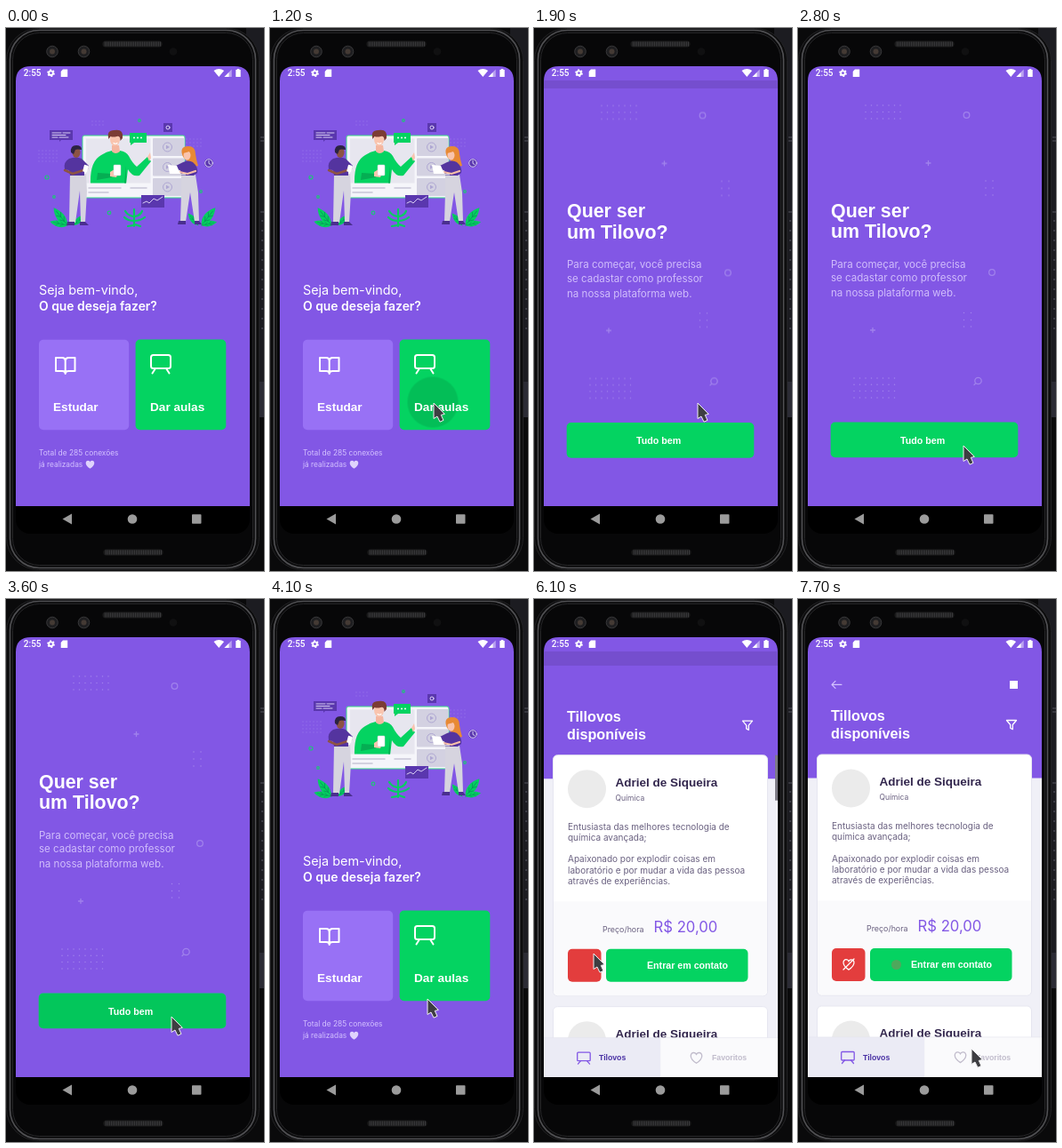
An HTML page for the animation above (8000 ms loop, 290 px wide and 611 px high).

```html
<!DOCTYPE html>
<html lang="pt-BR">
<head>
<meta charset="utf-8">
<title>App de aulas</title>
<style>
html, body { margin: 0; width: 100%; height: 100%; overflow: hidden; background: #0a0a0b; }
svg { display: block; position: absolute; left: 0; top: 0; }
.view, .page, .reveal { position: absolute; left: 0; top: 0; width: 263px; height: 479px; overflow: hidden; }
.view { left: 11px; top: 59px; background: #8257e5; }

.p { font-family: Inter, sans-serif; }
.a { font-family: "Liberation Sans", Arial, sans-serif; font-weight: 700; }
.line { fill: none; stroke-linecap: round; stroke-linejoin: round; }
.dots { fill: none; stroke-linecap: round; stroke-width: 1.5; }

/* All motion shares one 8 s clock; 1.25% = 100 ms */
.home, .reveal, .page, .dim, .tap, .late, .pattern, .bar, .cursor {
  animation: 8s cubic-bezier(.20833, .82, .25, 1) infinite;
}
.reveal { --y: 479px; }
.reveal > .page { --y: -459.4px; }
.teach, .teach > .page { animation-name: teach; }
.study, .study > .page { animation-name: study; }
.home { animation-name: home; }
.dim { animation-name: dim; }
.pattern { animation-name: pattern; }
.late { animation-name: late; }
.bar { animation-name: bar; animation-timing-function: linear; }
.cursor { animation-name: cursor; animation-timing-function: linear; }
.tap { animation-name: tap; animation-timing-function: linear; transform-box: fill-box; transform-origin: center; }
.t1 { animation-delay: -6800ms; }
.t2 { animation-delay: -4600ms; }
.t3 { animation-delay: -3200ms; }

@keyframes teach {
  0%, 20.26% { transform: translateY(var(--y)); }
  25.58%, 45.63% { transform: translateY(0); }
  50.94%, 100% { transform: translateY(var(--y)); }
}
@keyframes study {
  0%, 76.24% { transform: translateY(var(--y)); }
  76.25% { transform: translateY(calc(var(--y) * .034)); }
  77.5%, 100% { transform: translateY(0); }
}
@keyframes home {
  0%, 20.26% { transform: translateY(0); }
  25.58%, 45.63% { transform: translateY(-9.58px); }
  50.94%, 76.24% { transform: translateY(0); }
  76.25%, 100% { transform: translateY(-9.58px); }
}
@keyframes dim {
  0%, 20.26% { opacity: 0; }
  20.9%, 46.6% { opacity: .1; }
  50.94%, 76.24% { opacity: 0; }
  76.25%, 100% { opacity: .1; }
}
@keyframes tap {
  0% { opacity: .1; transform: scale(.3); }
  1.25% { opacity: .1; transform: scale(.75); }
  2.5% { opacity: .06; transform: scale(1); }
  3.75%, 100% { opacity: 0; transform: scale(1); }
}
@keyframes pattern { 0%, 22.49% { opacity: 0; } 22.5%, 100% { opacity: 1; } }
@keyframes late { 0%, 79.99% { opacity: 0; } 80%, 100% { opacity: 1; } }
@keyframes bar { 0%, 91.25% { opacity: 1; } 96.25%, 100% { opacity: 0; } }
@keyframes cursor {
  0%, 2.49% { opacity: 0; transform: translate(126px, 404px); }
  2.5% { opacity: 1; transform: translate(126px, 404px); }
  3.75% { transform: translate(152px, 407px); }
  5% { transform: translate(174px, 415px); }
  6.25%, 25% { transform: translate(183px, 421px); }
  26.25% { transform: translate(205px, 433px); }
  27.5% { transform: translate(229px, 456px); }
  28.75%, 34.99% { transform: translate(226px, 469px); }
  35%, 50% { transform: translate(185px, 469px); }
  51.25% { transform: translate(176px, 449px); }
  52.5% { transform: translate(143px, 421px); }
  53.75% { transform: translate(67px, 398px); }
  55%, 57.49% { transform: translate(74px, 402px); }
  57.5%, 80% { transform: translate(66px, 398px); animation-timing-function: ease-in-out; }
  87.5%, 100% { opacity: 1; transform: translate(194px, 505px); }
}
</style>
</head>
<body>

<!-- Phone -->
<svg width="290" height="611">
  <path fill="#1c1c21" d="M270 0h20v438h-20z"/>
  <path fill="#2c2c35" d="M284 398h6v40h-6z"/>
  <path stroke="#55555e" d="M286 123h4m-4 4h4m-4 80h4"/>
  <path stroke="#3c3c46" stroke-width="2" stroke-dasharray="2 9" d="M288 216v128"/>
  <rect x=".5" y=".5" width="284" height="609" rx="36" fill="#0c0c0d" stroke="#232325"/>
  <rect x="4.500" y="2.500" width="276" height="605" rx="33" fill="#0b0b0c" stroke="#505053" stroke-width="1.600"/>
  <rect x="7.500" y="5.500" width="270" height="599" rx="30" fill="#070708" stroke="#262628"/>
  <g stroke="#1c1c1d" stroke-width="7" stroke-linecap="round"><path d="M112 18h60M113 590h60"/></g>
  <g stroke="#3a3a3c" stroke-width="5" stroke-dasharray="1 1"><path d="M111 18h63M112 590h63"/></g>
  <g fill="#1e1e20" stroke="#38383a">
    <circle cx="52" cy="26.500" r="6.300"/><circle cx="87.500" cy="26.500" r="6.300"/>
  </g>
  <g fill="#443a34"><circle cx="52" cy="26.500" r="3"/><circle cx="87.500" cy="26.500" r="3"/></g>
  <circle cx="188" cy="26.500" r="4.300" fill="#101011"/>
  <rect x="11" y="43" width="263" height="526" rx="16"/>
  <path fill="#8257e5" d="M11 60q0-17 17-17h229q17 0 17 17z"/>
  <text x="19.800" y="54.200" font-family="Roboto, sans-serif" font-weight="500" font-size="10" fill="#fff">2:55</text>
  <g fill="#fff">
    <circle cx="50.500" cy="50.700" r="3.300"/>
    <path d="M64 46.500h5.200v8.500h-7.500v-6zM233.500 48q5.800-4 11.600 0l-5.800 7zM259.700 46h2.600v1h1.400v8h-5.400v-8h1.400z"/>
    <path d="M253.700 46.500V55h-8.500z" opacity=".45"/><path d="M250.500 50v5h-5z"/>
  </g>
  <circle cx="50.500" cy="50.700" r="3.500" fill="none" stroke="#fff" stroke-width="1.700" stroke-dasharray="1.830 1.830"/>
  <circle cx="50.500" cy="50.700" r="1.400" fill="#8257e5"/>
  <g fill="#9b9b9b">
    <path d="M63.500 552.500l10.500-6v12z"/><circle cx="142" cy="552.500" r="5.300"/><rect x="209" y="547.300" width="10.500" height="10.500" rx=".8"/>
  </g>
</svg>

<div class="view">
  <!-- Home -->
  <div class="home page" style="height:490px">
    <svg width="263" height="490" viewBox="11 59 263 490">
      <defs>
        <path id="heart" d="M0 4.500C-7 0-5-4.600-2.400-4.600-.9-4.600 0-3.500 0-2.900 0-3.500.9-4.600 2.400-4.600 5-4.600 7 0 0 4.500z"/>
        <g id="leaf">
          <path fill="#04cf60" d="M0 0C-7-6-6-17 0-25 5-17 6-7 0 0z"/>
          <path class="line" stroke="#0a8f5a" stroke-width=".7" d="M0 0v-20M0-6l-3-4M0-6l3-4M0-12l-3-4M0-12l3-4"/>
        </g>
        <g id="video">
          <rect x="165" y="124" width="35.500" height="20" rx="1" fill="#d3d1e1"/>
          <circle cx="181.500" cy="134" r="5" fill="none" stroke="#aea6d2"/>
          <path d="M180 131.700l4 2.300-4 2.300z" fill="#aea6d2"/>
        </g>
        <clipPath id="b1"><rect x="146" y="351" width="101" height="101" rx="5"/></clipPath>
        <clipPath id="b2"><rect x="37" y="444" width="210" height="39" rx="5"/></clipPath>
        <clipPath id="b3"><rect x="37" y="351" width="101" height="101" rx="5"/></clipPath>
        <clipPath id="panel"><path d="M90 100h80v74.500H90z"/></clipPath>
      </defs>
      <path fill="#8257e5" d="M11 59h263v490H11z"/>

      <g class="dots" stroke="#a487ee" stroke-width="1" stroke-dasharray="0 4" style="stroke-width:.9">
        <path d="M97 105h14M97 109h14M37 138h22M37 142h22M37 146h22M37 150h22M203 125h20M203 129h20M203 133h20"/>
      </g>
      <g fill="none" stroke="#1fc37a" stroke-width="1.200"><circle cx="46" cy="168" r="2"/><circle cx="116" cy="208" r="1.800"/><circle cx="150" cy="104" r="1.300"/><circle cx="219" cy="184" r="1.300"/><circle cx="54" cy="190" r="1.300"/></g>

      <!-- Monitor -->
      <rect x="86" y="121" width="115" height="70" rx="2" fill="#f5f5fa" stroke="#3ddb8c"/>
      <path fill="#e7e6ef" d="M90 124.500h72.500v50H90z"/>
      <use href="#video"/><use href="#video" y="22.500"/><use href="#video" y="45"/>
      <path class="line" stroke="#c9c6d6" stroke-width="1.500" d="M93 180h36M93 185h22M140 180h18"/>
      <g clip-path="url(#panel)">
        <path fill="#04d361" d="M95 176Q94 150 107 143q6-4 12-5h9q7 1 10 6 4 8 9 12l12-11 4 5-13 16q-8 2-13-7l-2 17z"/>
        <path fill="#05ae53" d="M103 163l16 1v4l-17 3zM135 155l-2 20h2z"/>
        <path fill="#f4b6a0" d="M119 132h8l1 7q-5 4-9 0z"/>
        <ellipse cx="122.500" cy="125" rx="5.500" ry="7.800" fill="#f9c4ae"/>
        <path fill="#7b3c34" d="M115.500 125q-3-10 6-10 11-2 9.500 9l-2.500 3q0-6-4-5-4 1-7 0z"/>
        <path class="line" stroke="#fff" stroke-width="1.200" d="M121 129.500q2 1.500 4 0"/>
        <path fill="#f9c4ae" d="M117 162l5-3 4 4-2 5-7-1zM159 145l3-5 1 6-2 4z"/>
        <rect x="121" y="154" width="8" height="12" rx="1" fill="#fff" stroke="#cfccd8" stroke-width=".5"/>
      </g>
      <path fill="#04d361" d="M139 118h19v11h-14l-4 3v-3h-1z"/>
      <path class="dots" stroke="#fff" stroke-dasharray="0 4" d="M144 123.500h9" style="stroke-width:2"/>

      <!-- Floating cards -->
      <g fill="#5a37ae">
        <path d="M49 115h26v11H62l-2 2v-2H49zM177 107h10v10h-10zM152 188h26v14h-26z"/>
        <circle cx="228" cy="152" r="5"/>
      </g>
      <g class="line" stroke="#e7e0fb" stroke-width=".9">
        <path d="M52 118h10m2 0h8M52 120.500h15M52 123h6m2 0h10M154 197l4-2 3 2 5-5 4 2 6-4M228 149.500v3l2 1"/>
        <circle cx="182" cy="112" r="2"/><circle cx="228" cy="152" r="4.300"/>
      </g>

      <!-- Plants -->
      <use href="#leaf" transform="translate(69 222) rotate(-38)"/>
      <use href="#leaf" transform="translate(69 222) rotate(-78) scale(.8)"/>
      <use href="#leaf" transform="translate(76 222) rotate(48) scale(.7)"/>
      <use href="#leaf" transform="translate(220 222) rotate(38)"/>
      <use href="#leaf" transform="translate(220 222) rotate(78) scale(.7)"/>
      <use href="#leaf" transform="translate(216 222) rotate(-40) scale(.7)"/>
      <path class="line" stroke="#04cf60" stroke-width="2.200" d="M144 223v-19M144 217q-7 0-11-4M144 217q7 0 12-4M143 212q-6-1-9-6M145 212q6-1 8-6M143 222l-6 1M145 221l6 2"/>

      <!-- People -->
      <path fill="#d6d4df" d="M72 164h18l1 20-2 35h-5l-1-36-5 36h-7z"/>
      <path fill="#4a2f8f" d="M69 218h8v4h-9zM83 218h6l4 4H83z"/>
      <path fill="#54349f" d="M71 147q8-3 14 0l8 8-3 5h-2v6H72l-1-6-5-1q-2-8 5-12z"/>
      <path class="line" stroke="#8c5344" stroke-width="2.500" d="M66 160l9 4 12-4M91 158l-3 2"/>
      <ellipse cx="79" cy="140" rx="4.500" ry="6" fill="#8c5344"/>
      <path fill="#2c2341" d="M73 140q-1-8 6-8 6 0 6 5-5-1-7 0l-2 5z"/>
      <rect x="87" y="154" width="5" height="8" rx="1" fill="#fff" transform="rotate(15 89 158)"/>

      <path fill="#d6d4df" d="M197 165h16l3 20 1 33h-5l-5-33-5 33h-6l1-33z"/>
      <path fill="#4a2f8f" d="M194 217h8v4h-9zM212 217h5l3 4h-8z"/>
      <path fill="#e88a35" d="M199 145q-5-12 6-12 8 0 8 9 1 7 3 13-8 2-11-4z"/>
      <path fill="#54349f" d="M199 151q6-3 11 0 6 5 5 12l-4 3h-14l-1-6-7-1 2-4z"/>
      <path class="line" stroke="#f7bfa8" stroke-width="2.200" d="M213 161l-9 3-9-2"/>
      <ellipse cx="203.500" cy="143" rx="4" ry="5.500" fill="#f9c4ae"/>
      <path fill="#e88a35" d="M199 141q0-7 6-7 6 1 4 10l-3-5q-3 1-7 2z"/>
      <path fill="#fff" d="M182 154l10 1 4 9h-12z"/>
      <path fill="#d4d2df" d="M184 164h18v1.500h-17z"/>

      <!-- Greeting and actions -->
      <text class="p" x="37" y="299.800" font-size="14.400" fill="#fff">Seja bem-vindo,</text>
      <text class="p" x="37" y="318.300" font-size="13.900" font-weight="600" fill="#fff">O que deseja fazer?</text>
      <rect x="37" y="350.700" width="101.200" height="101.500" rx="5" fill="#9871f5"/>
      <rect x="145.600" y="350.600" width="101.700" height="101.700" rx="5" fill="#04d361"/>
      <g clip-path="url(#b1)"><circle class="tap t1" cx="183" cy="421" r="95"/></g>
      <g clip-path="url(#b3)"><circle class="tap t3" cx="66" cy="398" r="90"/></g>
      <g class="line" stroke="#fff" stroke-width="2">
        <path d="M56 371h7q3.700 0 3.700 4v14q0-3-3.500-3H56zM77.500 371h-7q-3.800 0-3.800 4v14q0-3 3.500-3h7.300z"/>
        <rect x="163" y="368" width="22" height="15" rx="2.500"/>
        <path d="M168 383l-3.500 5.500M180 383l3.500 5.500"/>
      </g>
      <g class="a" font-size="13.600" fill="#fff"><text x="53" y="431">Estudar</text><text x="162" y="431">Dar aulas</text></g>
      <g class="p" font-size="8.350" fill="#d4c2ff"><text x="37" y="480.500">Total de 285 conexões</text><text x="37" y="493.800">já realizadas</text></g>
      <use href="#heart" x="94.500" y="491.300" fill="#dfd3fc"/>
      <path class="dim" d="M11 59h263v490H11z"/>
    </svg>
  </div>

  <!-- Teach -->
  <div class="teach reveal"><div class="page">
    <svg width="263" height="479" viewBox="11 59 263 479">
      <path fill="#8257e5" d="M11 59h263v479H11z"/>
      <g class="pattern" stroke="#a082ec">
        <g class="dots" stroke-dasharray="0 6.500">
          <path d="M76 87h39.500M76 94.500h39.500M76 102h39.500M63 394h47M63 401.300h47M63 408.600h47M63 416h47"/>
          <path stroke-dasharray="0 8" d="M211 172h8.500M211 180h8.500M211 188h8.500M186.500 320.500h8.500M186.500 328.500h8.500M186.500 336h8.500"/>
        </g>
        <g class="line" stroke-width="1.300">
          <circle cx="189.500" cy="98" r="3.300"/><circle cx="218" cy="275" r="3.300"/><circle cx="202.500" cy="397" r="3.700"/>
          <path d="M199.500 400l-1.500 1.500M146.500 149.500v5m-2.500-2.500h5M84 337.500v5m-2.500-2.500h5"/>
        </g>
      </g>
      <g class="a" font-size="21.400" fill="#fff"><text x="37" y="213">Quer ser</text><text x="37" y="236.300">um Tilovo?</text></g>
      <g class="p" font-size="11.550" fill="#d0bdfb">
        <text x="37" y="269.800">Para começar, você precisa</text>
        <text x="37" y="285.300">se cadastar como professor</text>
        <text x="37" y="302.200">na nossa plataforma web.</text>
      </g>
      <rect x="36.700" y="443.600" width="210.600" height="39.700" rx="5" fill="#04d361"/>
      <g clip-path="url(#b2)"><circle class="tap t2" cx="185" cy="469" r="150"/></g>
      <text class="a" x="115" y="467.600" font-size="10.700" fill="#fff">Tudo bem</text>
    </svg>
  </div></div>

  <!-- Study -->
  <div class="study reveal"><div class="page">
    <svg width="263" height="479" viewBox="11 59 263 479">
      <path fill="#f0f0f7" d="M11 59h263v479H11z"/>
      <path fill="#8257e5" d="M11 59h263v142.500H11z"/>
      <g class="late">
        <path class="line" stroke="#d4c2ff" stroke-width="1.200" d="M49 96.300H38m4-4l-4 4 4 4"/>
        <rect x="238" y="92" width="9" height="9" fill="#fff"/>
      </g>
      <g class="a" font-size="16.200" fill="#fff"><text x="37" y="137.300">Tillovos</text><text x="37" y="157">disponíveis</text></g>
      <path class="line" stroke="#fff" stroke-width="1.300" d="M234.500 136.500h11l-4.200 5v5.200l-2.600-1.500v-3.700z"/>

      <g id="card">
        <rect x="21.500" y="175" width="241" height="271" rx="5" fill="#fff" stroke="#e6e6f0"/>
        <circle cx="59.500" cy="213" r="21.500" fill="#ebebeb"/>
        <text class="a" x="91.500" y="210" font-size="13.500" fill="#32264d">Adriel de Siqueira</text>
        <text class="p" x="91.500" y="226" font-size="8.500" fill="#6a6180">Química</text>
      </g>
      <use href="#card" y="283"/>
      <g class="p" font-size="10" fill="#6a6180">
        <text x="38" y="259">Entusiasta das melhores tecnologia de</text>
        <text x="38" y="271.300">química avançada;</text>
        <text x="38" y="295.700">Apaixonado por explodir coisas em</text>
        <text x="38" y="308">laboratório e por mudar a vida das pessoa</text>
        <text x="38" y="320.300">através de experiências.</text>
      </g>
      <path fill="#fafafc" d="M22 339.500h240V440q0 5.500-5 5.500H27q-5 0-5-5.500z"/>
      <text class="p" x="77" y="374" font-size="8.900" fill="#6a6180">Preço/hora</text>
      <text class="p" x="134.500" y="374" font-size="16.700" fill="#8257e5">R$ 20,00</text>
      <rect x="38" y="393" width="37.500" height="37" rx="5" fill="#e33d3d"/>
      <rect x="81" y="393" width="159.500" height="37" rx="5" fill="#04d361"/>
      <g class="late">
        <use href="#heart" class="line" transform="translate(57 411.500) scale(1.250)" stroke="#fff"/>
        <path class="line" stroke="#fff" stroke-width="1.300" d="M51 417l12-12"/>
        <circle cx="110.500" cy="411.500" r="5.500" fill="#4fa85c"/>
      </g>
      <text class="a" x="127" y="415.300" font-size="10.650" fill="#fff">Entrar em contato</text>

      <path fill="#ebebf5" d="M11 493h131.500v45H11z"/>
      <path fill="#fafafc" d="M142.500 493H274v45H142.500z"/>
      <path stroke="#e4e4ee" stroke-width=".7" d="M11 493h263"/>
      <g class="line" stroke="#8257e5" stroke-width="1.300">
        <rect x="48.700" y="509.500" width="14.500" height="9.500" rx="1"/><path d="M52.500 519l-3 3.500M59.500 519l3 3.500"/>
      </g>
      <use href="#heart" class="line" transform="translate(182.500 515.800) scale(1.300)" stroke="#c1bccc"/>
      <g class="a" font-size="8.700"><text x="73" y="518.500" fill="#4a32a4">Tilovos</text><text x="200" y="518.500" fill="#c1bccc">Favoritos</text></g>
      <path class="bar" fill="#7c7a84" d="M271 175h3v51h-3z"/>
    </svg>
  </div></div>
</div>

<!-- Pointer -->
<svg width="290" height="611">
  <path class="cursor" fill="#3e3e42" stroke="#f0f0f2" stroke-linejoin="round"
    d="M1 1v17.500l4-2.500 3 6.200 4-1.800-2.700-6 4-1z"/>
</svg>

<script>
// The screen refreshes ten times a second.
const LOOP = 8000, STEP = 100;
const motions = document.getAnimations();
motions.forEach(m => m.pause());

function draw(now) {
  const t = Math.floor(((now + 2) % LOOP) / STEP) * STEP;
  for (const m of motions) m.currentTime = t;
  requestAnimationFrame(draw);
}
draw(performance.now());
</script>
</body>
</html>
```
